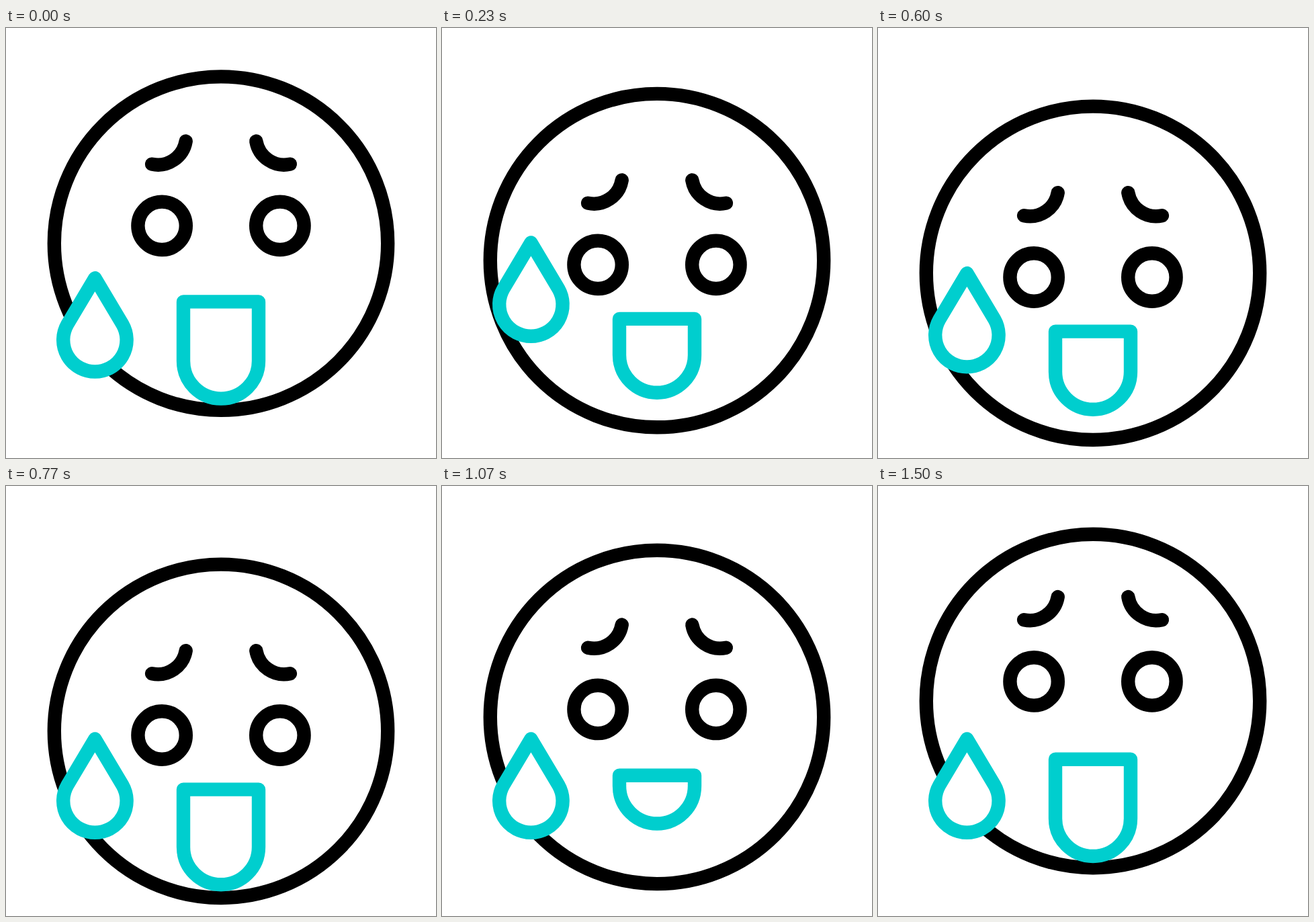
An HTML page that plays this animation: 640x640 px, repeating every 1.67 s.

```html
<!DOCTYPE html>
<html lang="en">
<head>
<meta charset="utf-8">
<title>Sweating face</title>
<style>
  html, body { margin: 0; width: 100%; height: 100%; overflow: hidden; background: #fff; }
  svg { display: block; width: 100%; height: 100%; }
</style>
</head>
<body>
<svg viewBox="0 0 640 640" fill="#fff" stroke="#000" stroke-width="20.4" stroke-linecap="round" stroke-linejoin="round">
  <g id="face">
    <circle cx="320" cy="320" r="248.2"/>
    <g id="look">
      <circle cx="232.1" cy="290.9" r="35.7"/>
      <circle cx="407.9" cy="290.9" r="35.7"/>
      <path fill="none" d="M217.1 199.2A42.3 42.3 0 0 0 267.7 165"/>
      <path fill="none" d="M422.9 199.2A42.3 42.3 0 0 1 372.3 165"/>
    </g>
    <path id="mouth" stroke="#00cece"/>
  </g>
  <path id="drop" stroke="#00cece" d="M132.4 376.5L173.4 445.2A47.2 47.2 0 1 1 91.4 445.2Z"/>
</svg>
<script>
const LOOP = 1670, LAST = 45;
const $ = id => document.getElementById(id);
const face = $('face'), look = $('look'), mouth = $('mouth'), drop = $('drop');

// eased 0..1 between two keys
function ease(u, a, b) {
  const s = Math.min(1, Math.max(0, (u - a) / (b - a)));
  return s * s * (3 - 2 * s);
}

// rises over a..b, holds, falls over c..d
const pulse = (u, a, b, c, d) => ease(u, a, b) - ease(u, c, d);

const shiftY = (el, y) => el.setAttribute('transform', `translate(0 ${y.toFixed(2)})`);

// picture index at 30 per second, on a 10 ms grid
function stepAt(t) {
  let n = Math.floor(t * 0.03) + 1;
  while (Math.round(n / 0.3) * 10 > t) n--;
  return Math.min(n, LAST);
}

function draw(ms) {
  const u = (stepAt(ms % LOOP) + 1) / 1.2; // keys run at 25 per second
  shiftY(face, 44.8 * pulse(u, 0, 12, 22.2, 33.3));
  shiftY(look, 35.3 * pulse(u, 0, 4.8, 20, 35));
  shiftY(drop, -57 * pulse(u, 0, 5, 8, 19));

  const shut = pulse(u, 2.2, 11.5, 11.5, 19) + pulse(u, 19, 28, 28.4, 38);
  const side = 406.8 + 88.2 - 73 * shut;
  mouth.setAttribute('d', `M264 406.8H376V${side.toFixed(2)}A56 56 0 0 1 264 ${side.toFixed(2)}Z`);
}

function tick(now) {
  draw(now);
  requestAnimationFrame(tick);
}

draw(0);
requestAnimationFrame(tick);
</script>
</body>
</html>
```
